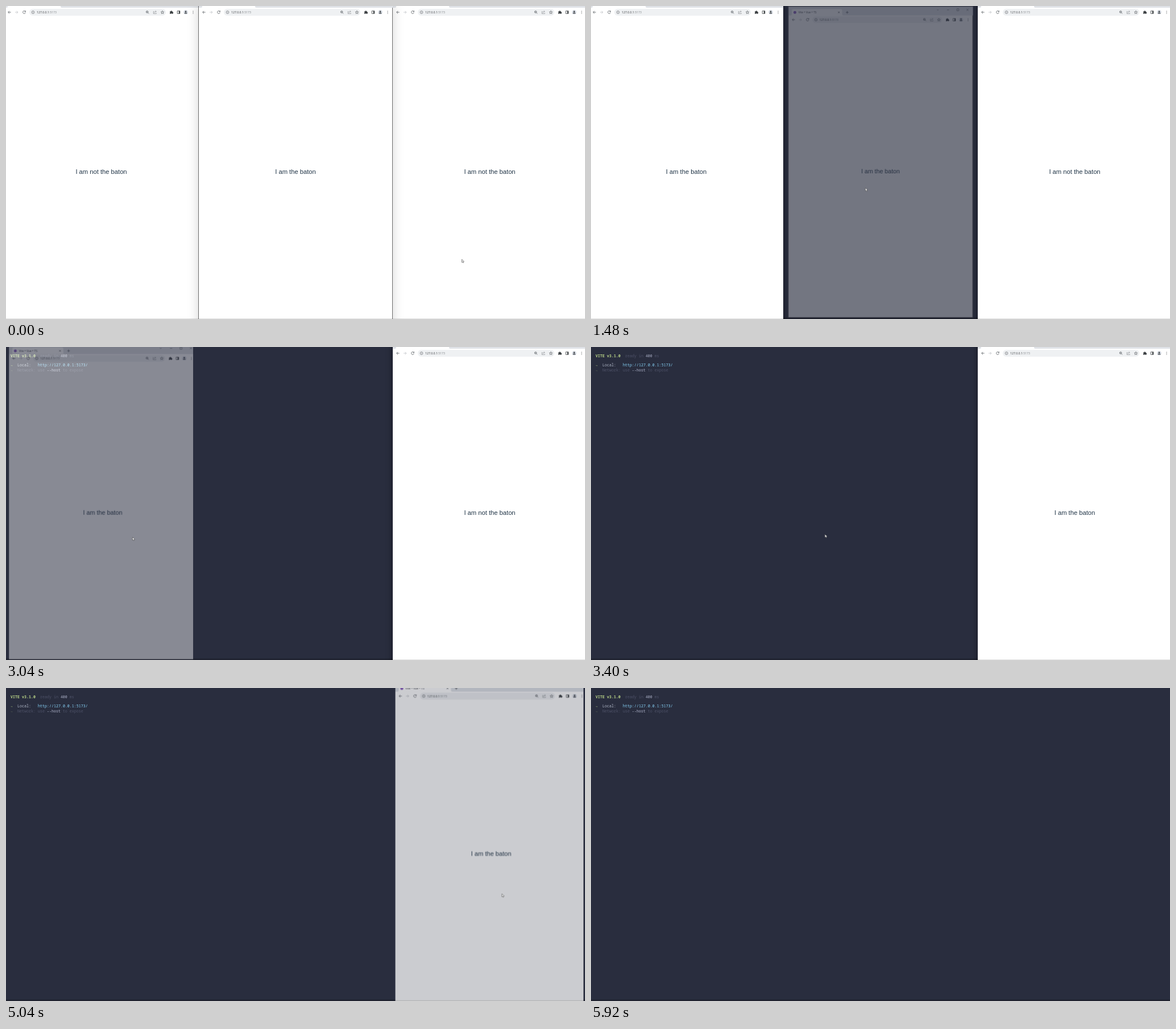
Recreate the animation shown at these times as an HTML page. Size 1018 by 550 pixels, loop 6.44 s.

```html
<!DOCTYPE html>
<html lang="en">
<head>
<meta charset="utf-8">
<title>Baton</title>
<style>
  html, body { margin: 0; width: 100%; height: 100%; overflow: hidden; background: #292d3e; }
  #stage { position: relative; width: 1018px; height: 550px; overflow: hidden; background: #292d3e; }

  #term {
    position: absolute; left: 8px; top: 11.7px; margin: 0;
    font: 6.66px/8.3px "Noto Sans Mono", "DejaVu Sans Mono", monospace;
    color: #4e5268;
  }
  #term b { color: #80859a; }
  #term .green { color: #b9d488; font-weight: 600; }
  #term .plain { color: #b4bccb; }
  #term .url { color: #89d6fb; }
  #term .dim { color: #66745f; }

  #stage::before, #stage::after { content: ""; position: absolute; left: 0; right: 0; bottom: 0; }
  #stage::before { height: 3px; background: rgba(0, 0, 0, .18); }
  #stage::after { height: 1px; background: rgba(0, 0, 0, .12); }

  .win {
    position: absolute; top: -13px; width: 341px; height: 574px;
    background: #fff; box-shadow: 0 3px 11px rgba(0, 0, 0, .45);
    animation: 6440ms step-end infinite;
  }
  .win svg { position: absolute; left: 0; top: 0; width: 341px; height: 40px; }
  .win p {
    position: absolute; left: 0; right: 0; top: 297.6px; margin: 0; text-align: center;
    font: 11.2px/12px "Liberation Sans", Arial, sans-serif; color: #213547;
    animation: 6440ms step-end infinite;
  }
  #left { left: -3px; animation-name: close-left; }
  #right { left: 680px; animation-name: close-right; }
  #mid {
    left: 339px; width: 340px; animation-name: close-mid;
    box-shadow: 0 0 0 1px #6b6b6b, 0 10px 20px rgba(0, 0, 0, .18);
  }
  #mid svg { left: -.5px; }
  #left .before { animation-name: left-off; }
  #left .after { animation-name: left-on; }
  #right .before { animation-name: right-off; }
  #right .after { animation-name: right-on; }

  #cursor {
    position: absolute; left: 0; top: 0; width: 16px; height: 16px; overflow: visible;
    animation: move 6440ms linear infinite;
  }
  #click { animation: click 6440ms step-end infinite; }

  @keyframes close-mid {
    0% { opacity: 1; transform: none; }
    21.74% { opacity: .8; transform: scale(.991); }
    22.36% { opacity: .58; transform: scale(.973); }
    22.98% { opacity: .35; transform: scale(.95); }
    24.22% { opacity: .1; transform: scale(.916); }
    24.84%, 100% { opacity: 0; transform: scale(.9); }
  }
  @keyframes close-left {
    0% { opacity: 1; transform: none; clip-path: none; }
    46.58% { opacity: .76; transform: translateX(2.5px) scale(.988); clip-path: inset(0 6px 3px 0); }
    47.2% { opacity: .45; transform: translateX(2.5px) scale(.966); clip-path: inset(0 6px 3px 0); }
    48.45% { opacity: .14; transform: translateX(2.5px) scale(.922); clip-path: inset(0 6px 3px 0); }
    49.07%, 100% { opacity: 0; transform: scale(.9); clip-path: none; }
  }
  @keyframes close-right {
    0% { opacity: 1; transform: none; clip-path: none; }
    78.26% { opacity: .76; transform: translateX(2.5px) scale(.988); clip-path: inset(0 6px 0 0); }
    78.88% { opacity: .5; transform: translateX(2.5px) scale(.966); clip-path: inset(0 6px 0 0); }
    79.5% { opacity: .3; transform: translateX(2.5px) scale(.943); clip-path: inset(0 6px 0 0); }
    80.12% { opacity: .14; transform: translateX(2.5px) scale(.922); clip-path: inset(0 6px 0 0); }
    80.75%, 100% { opacity: 0; transform: scale(.9); clip-path: none; }
  }
  @keyframes left-off { 0% { opacity: 1; } 22.36%, 100% { opacity: 0; } }
  @keyframes left-on { 0% { opacity: 0; } 22.36%, 100% { opacity: 1; } }
  @keyframes right-off { 0% { opacity: 1; } 49.07%, 100% { opacity: 0; } }
  @keyframes right-on { 0% { opacity: 0; } 49.07%, 100% { opacity: 1; } }

  @keyframes move {
    0% { transform: translate(801px, 445px); }
    .5% { transform: translate(801px, 445px); animation-timing-function: ease-in-out; }
    5.59%, 11.1% { transform: translate(472.5px, 317.5px); }
    13.04%, 19.25% { transform: translate(474.5px, 318px); }
    21.74% { transform: translate(482px, 319.5px); }
    29.7% { transform: translate(482px, 319.5px); animation-timing-function: ease-in; }
    32% { transform: translate(360px, 306px); animation-timing-function: ease-out; }
    35.4%, 46.5% { transform: translate(219.5px, 333px); }
    47.2% { transform: translate(222px, 334px); }
    50.31% { transform: translate(230px, 332px); animation-timing-function: ease-in-out; }
    56.52% { transform: translate(768px, 323px); }
    57.7% { transform: translate(769px, 322.5px); animation-timing-function: ease-out; }
    61.49%, 72.05% { transform: translate(821.5px, 323px); }
    74.53% { transform: translate(824px, 324px); animation-timing-function: ease-in; }
    78.26% { transform: translate(871px, 361px); }
    81.37%, 82.6% { transform: translate(955px, 442px); }
    91.93%, 100% { transform: translate(1007px, 552px); }
  }
  @keyframes click {
    0% { opacity: 0; }
    16.15% { opacity: 1; } 16.77% { opacity: 0; }
    37.89% { opacity: 1; } 39.75% { opacity: 0; }
    67.08% { opacity: 1; } 69.57%, 100% { opacity: 0; }
  }
</style>
</head>
<body>
<svg width="0" height="0" style="position:absolute">
  <symbol id="chrome" viewBox="0 0 341 40">
    <path d="M0 0H341V16.1H0Z" fill="#dfe2e7"/>
    <path d="M4 16.1Q6 16.1 6 14V7Q6 4 9 4H96Q99 4 99 7V14Q99 16.1 101 16.1Z" fill="#fff"/>
    <circle cx="11.5" cy="10.3" r="2.6" fill="#8a5cc0"/>
    <rect x="44" y="18" width="240" height="12" rx="6" fill="#eff1f3"/>
    <g font-family="'Noto Sans', 'Open Sans', sans-serif">
      <text x="18" y="12.1" font-size="4.9" fill="#45494d">Vite + Vue + TS</text>
      <text x="57" y="26" font-size="5.15" fill="#404448">127.0.0.1<tspan fill="#85898d">:5173</tspan></text>
    </g>
    <g fill="none" stroke="#54585d" stroke-width=".8">
      <!-- tab strip controls -->
      <path d="M91.4 8.9l2.8 2.8m0-2.8l-2.8 2.8M106 10.3h4.8m-2.4-2.4v4.8"/>
      <path d="M274.5 5l1.5 1.5L277.5 5M293 5.8h4M311.3 3.8h3.6v3.6h-3.6zM329.2 3.8l3.6 3.6m0-3.6l-3.6 3.6" stroke-width=".6"/>
      <!-- navigation -->
      <path d="M11.6 24H6.8m2.2-2.3L6.7 24 9 26.3"/>
      <path d="M19 24h4.8m-2.2-2.3L23.9 24l-2.3 2.3" stroke="#bfc2c6"/>
      <path d="M37 22.6a2.4 2.4 0 1 0 .3 2M37.4 21.2v1.9h-1.9"/>
      <circle cx="50.5" cy="24" r="2.4" stroke-width=".6"/>
      <path d="M50.5 23.7v1.6m0-2.9v.6" stroke-width=".6"/>
      <!-- address bar tools -->
      <circle cx="251.2" cy="23.4" r="1.8"/>
      <path d="M252.5 24.7l1.8 1.8M250.3 23.4h1.8" stroke-width=".7"/>
      <path d="M263.3 22.5h-1v4h5v-1.2M263.8 25q.3-2.4 2.8-2.4m-1-1.3l1.7 1.4-1.7 1.4" stroke="#777b80" stroke-width=".6"/>
      <path d="M278 21.3l.8 1.9 2 .1-1.6 1.3.6 2-1.8-1.1-1.8 1.1.6-2-1.6-1.3 2-.1z" stroke-width=".65"/>
      <path d="M304.2 21.7h4.6v4.6h-4.6z" stroke="#3c4043"/>
    </g>
    <g fill="#3c4043">
      <path d="M291 22.4h1.6a1.1 1.1 0 0 1 2.2 0h1.4v1.5a1.1 1.1 0 0 1 0 2.2v.7h-1.6a.9.9 0 0 0-1.8 0H291v-1.5a.9.9 0 0 0 0-1.6z"/>
      <path d="M306.8 21.7h2v4.6h-2z"/>
      <circle cx="319" cy="24" r="3.7" fill="#d5dae3"/>
      <circle cx="319" cy="22.8" r="1.3"/>
      <path d="M316.5 26.2q0-1.7 2.5-1.7t2.5 1.7z"/>
      <circle cx="332" cy="22" r=".55"/><circle cx="332" cy="24" r=".55"/><circle cx="332" cy="26" r=".55"/>
    </g>
  </symbol>
</svg>

<div id="stage">
<pre id="term"><b class="green">VITE v3.1.0</b>  ready in <b>400</b> ms

<b class="green">→</b>  <span class="plain">Local:</span>   <span class="url">http://127.0.0.1:5173/</span>
<span class="dim">→</span>  Network: use <b>--host</b> to expose</pre>

  <div class="win" id="left">
    <svg><use href="#chrome"/></svg>
    <p class="before">I am not the baton</p>
    <p class="after">I am the baton</p>
  </div>
  <div class="win" id="right">
    <svg><use href="#chrome"/></svg>
    <p class="before">I am not the baton</p>
    <p class="after">I am the baton</p>
  </div>
  <div class="win" id="mid">
    <svg><use href="#chrome"/></svg>
    <p>I am the baton</p>
  </div>

  <svg id="cursor">
    <circle id="click" cx="1" cy=".8" r="3.6" fill="#ffee2e"/>
    <path d="M.4 .3V5.4L1.6 4.5 2.5 6.3 3.5 5.8 2.7 4.1 4.4 3.9Z" fill="#fff" stroke="#484848" stroke-width=".65"/>
  </svg>
</div>
</body>
</html>
```
